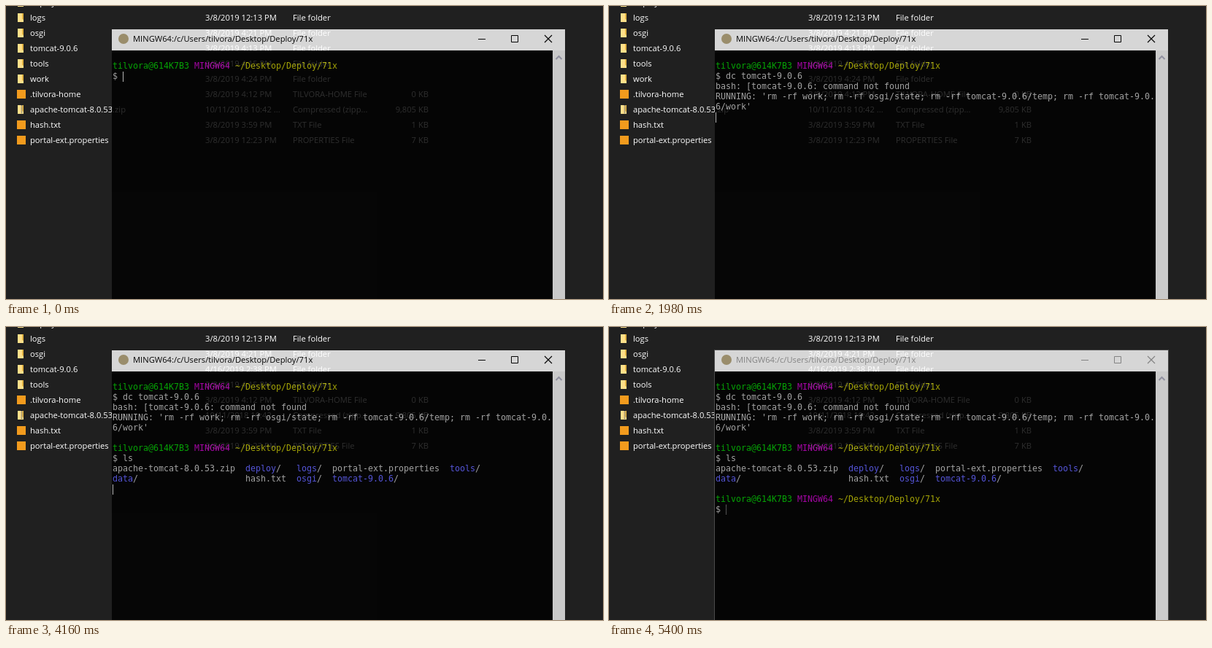
Write an HTML page that moves like this. It is 818x402 px and loops after 5.47 s.

```html
<!DOCTYPE html>
<html lang="en">
<head>
<meta charset="utf-8">
<title>Terminal session</title>
<style>
  html, body { margin: 0; width: 100%; height: 100%; overflow: hidden; background: #202020; }
  #stage { position: relative; width: 818px; height: 402px; overflow: hidden; background: #202020; }
  #stage div, #stage svg { position: absolute; }
  .ui { font: 11.2px/20px "Open Sans", "Noto Sans", sans-serif; white-space: pre; }
  #files { color: #fff; }
  #win { left: 145px; top: 32px; width: 621px; height: 380px; opacity: .82; }
  #win.idle { outline: 1px solid #555; }
  #bar { width: 621px; height: 29px; background: #fff; color: #000; }
  .idle #bar { color: #999; }
  #bar svg, #scroll svg { left: 0; top: 0; }
  #body { top: 29px; width: 604px; height: 351px; background: #000; }
  #scroll { left: 604px; top: 29px; width: 17px; height: 351px; background: #f0f0f0; }
  #text { left: 1px; top: 43px; color: #bfbfbf; white-space: pre;
          font: 11.63px/14px "DejaVu Sans Mono", "Liberation Mono", monospace; }
  #caret { width: 1px; height: 14px; background: #d8d8d8; }
  .idle #caret { background: repeating-linear-gradient(#bfbfbf 0 1px, #000 1px 2px); }
  .g { color: #00bf00; } .m { color: #bf00bf; } .y { color: #bfbf00; } .b { color: #6060ff; }
</style>
</head>
<body>
<div id="stage">
  <div id="files" class="ui"></div>
  <div id="win">
    <div id="bar" class="ui">
      <div style="left:9px;top:6px;width:14px;height:14px;border-radius:50%;background:#b5a67c"></div>
      <div style="left:29px;top:3px">MINGW64:/c/Users/tilvora/Desktop/Deploy/71x</div>
      <svg width="621" height="29" fill="none" stroke="currentColor">
        <path d="M502 13.5h10M547.5 8.5h9v9h-9z"/>
        <path d="M593 8l10 10m0-10l-10 10" stroke-width="1.2"/>
      </svg>
    </div>
    <div id="body"></div>
    <div id="scroll">
      <svg width="17" height="17" fill="none" stroke="#a9a9bb" stroke-width="2"><path d="M4.5 12l4-4 4 4"/></svg>
    </div>
    <div id="text"></div>
    <div id="caret"></div>
  </div>
  <svg id="mouse" width="24" height="36" viewBox="-12 -18 24 36" fill="none">
    <path d="M-9.500-15H-3Q0-15 0-12Q0-15 3-15H9.500M0-13V13M-9.500 15H-3Q0 15 0 12Q0 15 3 15H9.500" stroke="#fff" stroke-width="3"/>
  </svg>
</div>
<script>
const LOOP = 5470;
const $ = id => document.getElementById(id);
const span = (cls, s) => `<span class="${cls}">${s}</span>`;

// File listing: kind, name, date, type, size
const folder = (name, date) => ['folder', name, date, 'File folder', ''];
const tail = [
  ['file', '.tilvora-home', '3/8/2019 4:12 PM', 'TILVORA-HOME File', '0 KB'],
  ['zip', 'apache-tomcat-8.0.53.zip', '10/11/2018 10:42 ...', 'Compressed (zipp...', '9,805 KB'],
  ['file', 'hash.txt', '3/8/2019 3:59 PM', 'TXT File', '1 KB'],
  ['file', 'portal-ext.properties', '3/8/2019 12:23 PM', 'PROPERTIES File', '7 KB']
];
const listing = (tomcatDate, work) => [
  folder('deploy', '3/8/2019 12:13 PM'),
  folder('logs', '3/8/2019 12:13 PM'),
  folder('osgi', '3/8/2019 4:21 PM'),
  folder('tomcat-9.0.6', tomcatDate),
  folder('tools', '3/8/2019 4:15 PM'),
  ...work, ...tail
];
const before = listing('3/8/2019 4:13 PM', [folder('work', '3/8/2019 4:24 PM')]);
const after = listing('4/16/2019 2:38 PM', []);

const folderShape = '<path d="M3 2h8v12H3z" fill="#e3b341"/><path d="M3 2h6v8l2 1v3H3z" fill="#ffe08a"/>';
const icons = {
  folder: folderShape,
  zip: folderShape + '<path d="M8.500 2v11" stroke="#6b6b6b" stroke-width="2" stroke-dasharray="1 1"/>',
  file: '<path d="M2 2h12v12H2z" fill="#f29b1d"/>'
};

function drawFiles(rows) {
  $('files').innerHTML = rows.map(([kind, name, date, type, size], i) => {
    const y = i * 21 - 15;
    const cell = (x, s) => `<div style="left:${x}px;top:${y}px">${s}</div>`;
    return `<svg width="16" height="16" style="left:13px;top:${y + 2}px">${icons[kind]}</svg>` +
      cell(33, name) + cell(273, date) + cell(393, type) +
      `<div style="left:479px;width:100px;top:${y}px;text-align:right">${size}</div>`;
  }).join('');
}

// Terminal text
const prompt = span('g', 'tilvora@614K7B3') + ' ' + span('m', 'MINGW64') + ' ' +
  span('y', '~/Desktop/Deploy/71x') + '\n$ ';
const dir = s => span('b', s) + '/';
const ran = prompt + `dc tomcat-9.0.6
bash: [tomcat-9.0.6: command not found
RUNNING: 'rm -rf work; rm -rf osgi/state; rm -rf tomcat-9.0.6/temp; rm -rf tomcat-9.0.
6/work'
`;
const ready = ran + '\n' + prompt;
const listed = ready + 'ls\napache-tomcat-8.0.53.zip  ' + dir('deploy') + '   ' + dir('logs') +
  '  portal-ext.properties  ' + dir('tools') + '\n' + dir('data') + ' '.repeat(21) +
  'hash.txt  ' + dir('osgi') + '  ' + dir('tomcat-9.0.6') + '\n';
const done = listed + '\n' + prompt;

// time, text, caret column and row (null hides it)
const steps = [[0, prompt, 2, 1]];
const type = (base, row, s, times) =>
  times.forEach((t, i) => steps.push([t, base + s.slice(0, i + 1), 3 + i, row]));
type(prompt, 1, 'dc tom', [250, 320, 490, 560, 640, 710]);
steps.push(
  [880, prompt + 'dc tomcat-9.0.6/', 18, 1],
  [1410, prompt + 'dc tomcat-9.0.6/', null],
  [1490, prompt + 'dc tomcat-9.0.6', 17, 1],
  [1580, prompt + 'dc tomcat-9.0.6', null],
  [1980, ran, 0, 5],
  [2510, ready, 2, 7],
  [2970, ready, null],
  [3520, ready, 2, 7]
);
type(ready, 7, 'ls', [3920, 4000]);
steps.push(
  [4160, listed, 0, 10],
  [4310, done, 2, 12],
  [4850, done, null],
  [5400, done, 2, 12]
);

const mousePath = [[4690, 588, 342], [4770, 602, 354], [4850, 624, 373], [4920, 644, 396], [5000, -50, -50]];
const at = (table, t) => table.filter(s => s[0] <= t).pop();

let lastStep, lastRows;
function draw(t) {
  const step = at(steps, t);
  const rows = t < 3520 ? before : after;
  if (rows !== lastRows) drawFiles(lastRows = rows);
  if (step !== lastStep) {
    const [, text, col, row] = lastStep = step;
    $('text').innerHTML = text;
    const caret = $('caret').style;
    caret.display = col === null ? 'none' : 'block';
    caret.left = 1 + 7 * col + 'px';
    caret.top = 44 + 14 * row + 'px';
  }
  $('win').className = t >= 5320 ? 'idle' : '';

  const [, x, y] = at(mousePath, t) || [0, -50, -50];
  $('mouse').style.left = x - 12 + 'px';
  $('mouse').style.top = y - 18 + 'px';
}

const start = performance.now();
function tick() {
  draw((performance.now() - start) % LOOP);
  requestAnimationFrame(tick);
}
tick();
</script>
</body>
</html>
```
